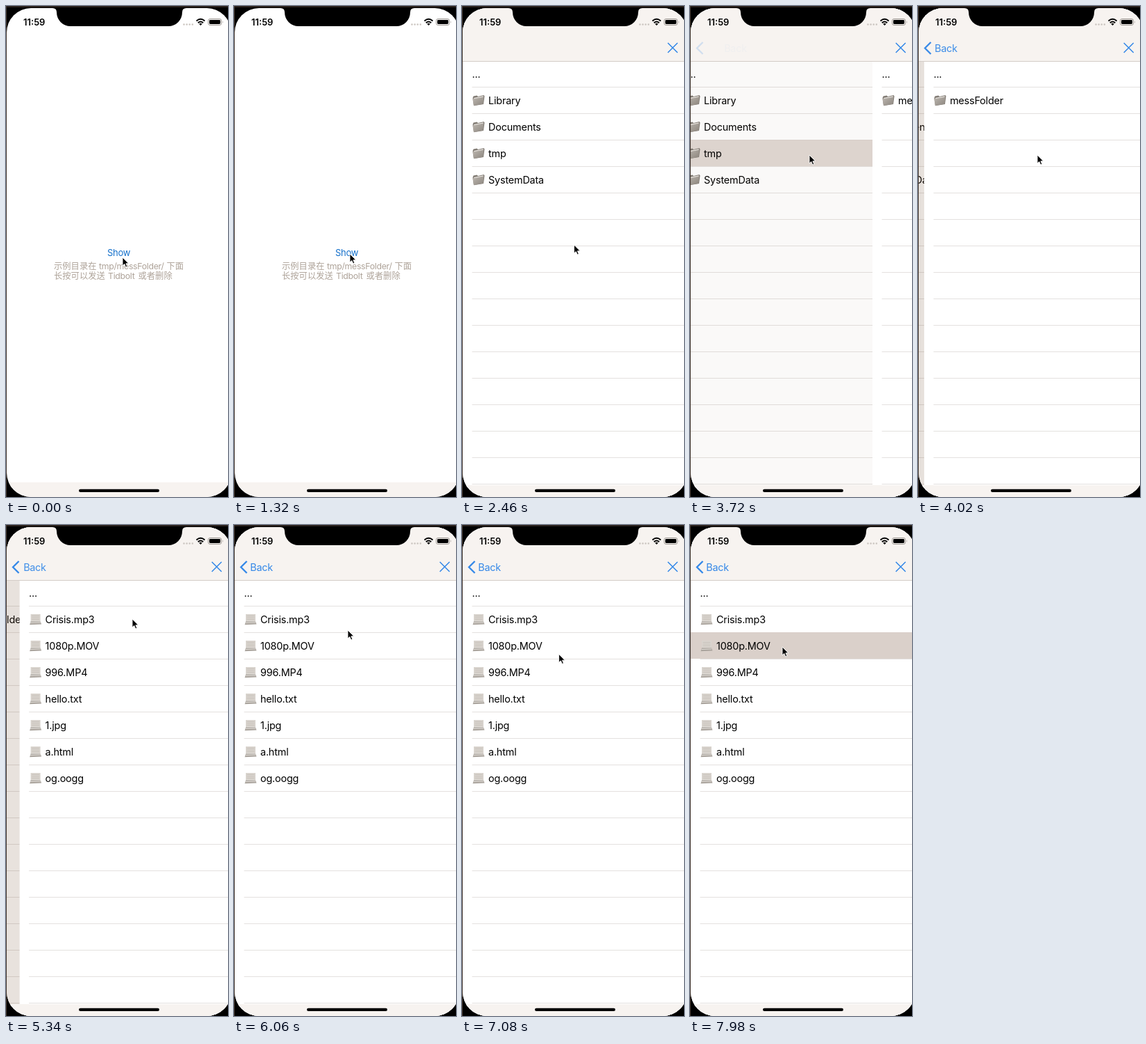
Recreate the animation shown at these times as an HTML page. Size 320 by 705 pixels, loop 8 s.

```html
<!DOCTYPE html>
<html lang="zh">
<head>
<meta charset="utf-8">
<title>Folder browser</title>
<style>
  html, body { margin: 0; width: 100%; height: 100%; overflow: hidden; background: #000; }
  svg { display: block; width: 100vw; height: 100vh; }
  text { font-family: Inter, "Noto Sans CJK SC", "Noto Sans CJK", sans-serif; white-space: pre; }
  .row { font-size: 14.4px; letter-spacing: -.18px; }
  .back { font-size: 14.4px; letter-spacing: -.25px; fill: #3488e8; }
  .blue { fill: none; stroke: #3488e8; }
  .show { font-size: 13px; letter-spacing: -.3px; fill: #1671cb; }
  .hint { font-size: 12.3px; fill: #aea399; }
  .latin { letter-spacing: -.3px; }
  .time { font-size: 13px; font-weight: 600; }
  .line { stroke: #e4e1df; }
  .edge { stroke: #d3ccc7; }
  .bar { fill: #f7f3f0; }
  .mark { fill: #dad0ca; }
</style>
</head>
<body>
<svg viewBox="0 0 320 705" preserveAspectRatio="none">
  <defs>
    <clipPath id="screen"><rect x="1" y="3" width="323.5" height="702" rx="35"/></clipPath>
    <linearGradient id="metal" x1="0" y1="0" x2="1" y2="1">
      <stop offset="0" stop-color="#bdb7b0"/><stop offset="1" stop-color="#8d8780"/>
    </linearGradient>
    <g id="folder">
      <path d="M1 5 L2 2.5 L7 1.5 L8.5 3 L17 1 L18 2.5 L16.5 14 L2.5 16.2Z" fill="#827c75"/>
      <path d="M2.5 5 L16.5 2.3 L16 4 L3 7Z" fill="#e9e5e0"/>
      <path d="M.8 6.6 L16.8 3.6 L16 13.8 L2.5 16Z" fill="url(#metal)"/>
    </g>
    <g id="file">
      <path d="M2.5 1 H16.5 V11.5 H2.5Z" fill="#d9d4ce"/>
      <path d="M4 3.5 H15 M4 6 H15 M4 8.5 H15" stroke="#c9c3bc"/>
      <path d="M2.5 11.5 H16.5 L18 15.5 L1 16.3Z" fill="#aaa49d"/>
      <path d="M2 13.5 L16.8 13" stroke="#e6e2dd"/>
    </g>
  </defs>

  <rect width="320" height="705"/>
  <rect width="320" height="2" fill="#2a211c"/>
  <rect width="1" height="705" fill="#43372f"/>

  <g clip-path="url(#screen)">
    <rect y="3" width="325" height="702" fill="#fff"/>
    <rect class="bar" y="684" width="325" height="21"/>
    <text class="show" id="show" x="146" y="359">Show</text>
    <g class="hint">
      <text x="69" y="377.5">示例目录在</text>
      <text class="latin" x="134" y="377.5">tmp/messFolder/</text>
      <text x="231.5" y="377.5">下面</text>
      <text x="69" y="391.5">长按可以发送</text>
      <text class="latin" x="147" y="391.5">Tidbolt</text>
      <text x="190.5" y="391.5">或者删除</text>
    </g>

    <g id="modal">
      <g id="pages"></g>
      <rect class="bar" y="3" width="325" height="76"/>
      <path class="edge" d="M0 79.5H325"/>
      <rect class="bar" y="688" width="325" height="17"/>
      <path class="blue" stroke-width="1.5" d="M296.7 53 L310.7 67 M310.7 53 L296.7 67"/>
      <g id="back">
        <path class="blue" stroke-width="2.3" d="M18.5 52 L10 60.5 L18.5 69"/>
        <text class="back" id="backText" y="65.5">Back</text>
      </g>
    </g>

    <path d="M67 3Q73 3 73 9A20 20 0 0 0 93 29H234A20 20 0 0 0 254 9Q254 3 260 3Z"/>
    <text class="time" x="25" y="28">11:59</text>
    <path d="M256.5 26.5H270" stroke="#cbc5c0" stroke-width="2.6" stroke-linecap="round" stroke-dasharray="0 4.1"/>
    <g fill="none" stroke="#000" stroke-width="2">
      <path d="M274.5 21.5Q280.5 16 286.5 21.5"/>
      <path d="M276.8 24.2Q280.5 20.7 284.2 24.2"/>
    </g>
    <path d="M278.3 25.7Q280.5 24 282.7 25.7L280.5 28Z"/>
    <rect x="291.5" y="18.5" width="19" height="9" rx="2.6" fill="none" stroke="#9c9691"/>
    <rect x="293" y="20" width="16" height="6" rx="1.4"/>
    <path d="M312 21.5Q313.5 23 312 24.8Z" fill="#9c9691"/>
    <rect x="105" y="693.8" width="116" height="4.3" rx="2.15"/>
  </g>

  <path id="cursor" d="M0 0V12L2.8 9.5L4.8 14L6.8 13.1L4.9 8.8H8.8Z" stroke="#fff" stroke-width=".9"/>
</svg>

<script>
const LOOP = 8000, WIDTH = 324, TOP = 79, ROW = 38, PARALLAX = .29;
const SHOW_TAP = [1560, 1760];
const MODAL = { at: 1670, rate: .03, length: 250 };
const PUSHES = [3671, 5055].map(at => ({ at, rate: .016, length: 640 }));

const PAGES = [
  { icon: 'folder', items: ['Library', 'Documents', 'tmp', 'SystemData'], tapped: 3, tap: 3660 },
  { icon: 'folder', items: ['messFolder'], tapped: 1, tap: 5000 },
  { icon: 'file', items: ['Crisis.mp3', '1080p.MOV', '996.MP4', 'hello.txt', '1.jpg', 'a.html', 'og.oogg'],
    tapped: 2, tap: 7850 }
];

// time, x, y of the pointer tip
const PATH = [
  [0, 168, 361], [780, 167, 356], [2400, 167, 356], [2460, 161.5, 343],
  [3000, 172, 214], [4440, 172, 214], [4920, 182, 135], [5640, 182, 135],
  [6060, 164, 151], [6240, 164, 151], [6960, 140, 186], [7800, 133, 175]
];

const $ = id => document.getElementById(id);

function add(parent, tag, attrs, text) {
  const el = document.createElementNS('http://www.w3.org/2000/svg', tag);
  for (const key in attrs) el.setAttribute(key, attrs[key]);
  if (text) el.textContent = text;
  return parent.appendChild(el);
}

function buildPage({ icon, items, tapped }) {
  const group = add($('pages'), 'g', {});
  add(group, 'rect', { x: 1, y: 3, width: WIDTH, height: 702, fill: '#fff' });
  for (let y = TOP + ROW; y < 700; y += ROW) {
    add(group, 'path', { class: 'line', d: `M14.5 ${y - .5}H325` });
  }
  const mark = add(group, 'rect', { class: 'mark', x: 1, y: TOP + ROW * tapped - 1, width: WIDTH, height: ROW });
  add(group, 'text', { class: 'row', x: 14.5, y: TOP + 24 }, '...');
  items.forEach((name, i) => {
    const y = TOP + ROW * (i + 1);
    add(group, 'use', { href: '#' + icon, x: 14.5, y: y + 10 });
    add(group, 'text', { class: 'row', x: 38, y: y + 24 }, name);
  });
  const dim = add(group, 'rect', { x: 1, y: 3, width: WIDTH, height: 702, fill: '#5a3210' });
  return { group, mark, dim };
}

const views = PAGES.map(buildPage);

// Remaining share of a critically damped slide: 1 before it, 0 after it
function left(t, { at, rate, length }) {
  if (t <= at) return 1;
  if (t >= at + length) return 0;
  const k = rate * (t - at);
  return (1 + k) * Math.exp(-k);
}

function pointer(t) {
  const i = PATH.findIndex(p => p[0] > t);
  if (i < 0) return PATH[PATH.length - 1].slice(1);
  const [t0, x0, y0] = PATH[i - 1], [t1, x1, y1] = PATH[i];
  const u = (t - t0) / (t1 - t0), e = u * u * (3 - 2 * u);
  return [x0 + (x1 - x0) * e, y0 + (y1 - y0) * e];
}

const move = (el, x, y) => el.setAttribute('transform', `translate(${x.toFixed(2)} ${y.toFixed(2)})`);

function render(t) {
  const pressed = t >= SHOW_TAP[0] && t < SHOW_TAP[1];
  $('show').setAttribute('opacity', pressed ? .3 : 1);
  move($('modal'), 0, 702 * left(t, MODAL));

  const rest = PUSHES.map(p => left(t, p));
  views.forEach(({ group, mark, dim }, i) => {
    const enter = i ? rest[i - 1] : 0;
    const leave = i < rest.length ? 1 - rest[i] : 0;
    move(group, WIDTH * (enter - PARALLAX * leave), 0);
    group.setAttribute('visibility', enter < 1 && leave < 1 ? 'visible' : 'hidden');
    mark.setAttribute('opacity', t >= PAGES[i].tap ? 1 - leave : 0);
    dim.setAttribute('opacity', .15 * leave);
  });

  const shift = t < PUSHES[1].at ? rest[0] : rest[1];
  $('back').setAttribute('opacity', 1 - rest[0]);
  $('backText').setAttribute('x', 23.3 + 32 * shift);
  $('backText').setAttribute('opacity', 1 - shift);
  move($('cursor'), ...pointer(t));
}

const start = performance.now();
function tick() {
  render((performance.now() - start) % LOOP);
  requestAnimationFrame(tick);
}
tick();
</script>
</body>
</html>
```
